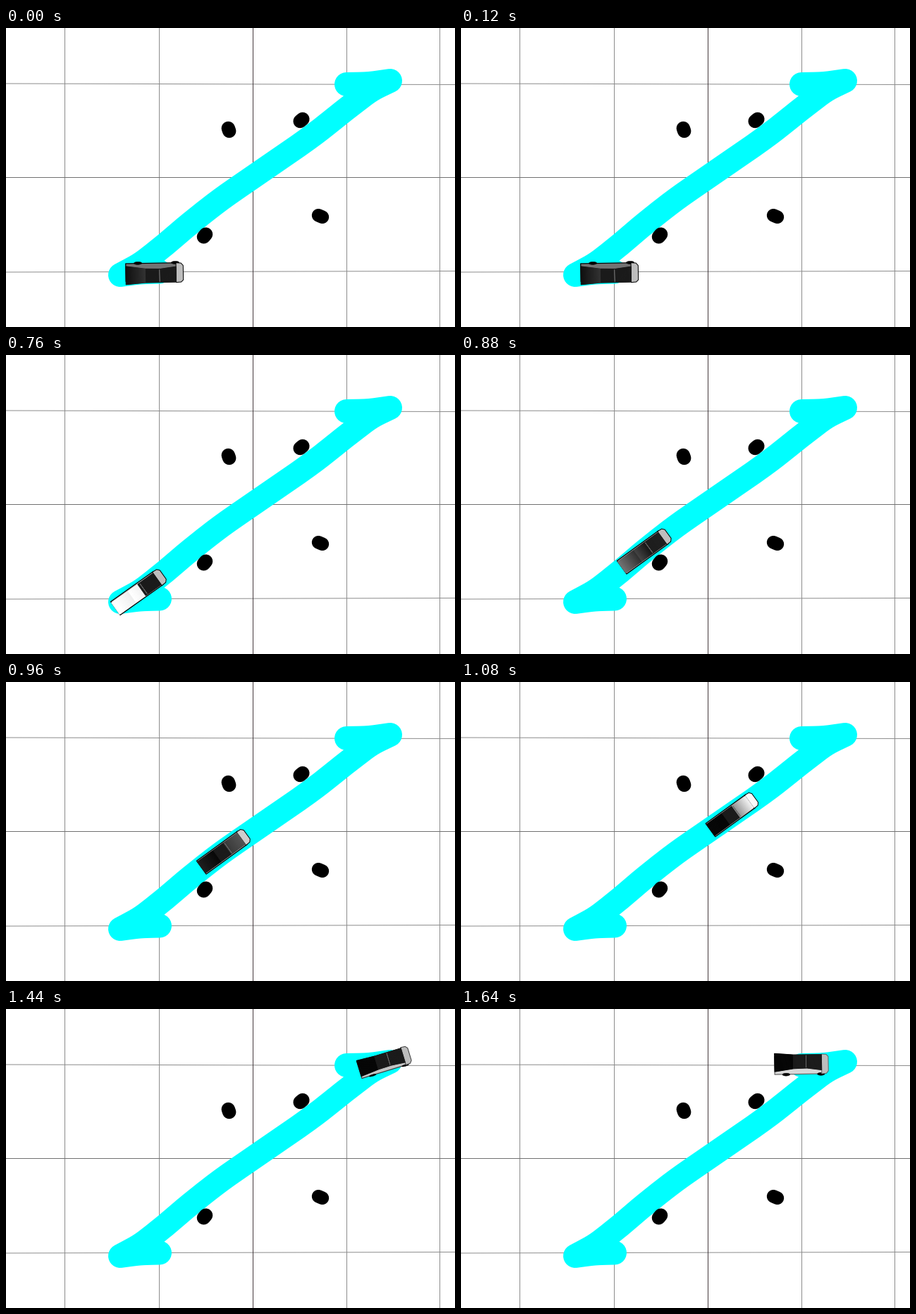
Animation of 637x425 px, one loop 2.04 s. Source, as a matplotlib script:

```python
import numpy as np
import matplotlib.pyplot as plt
from matplotlib.animation import FuncAnimation
from matplotlib.collections import PolyCollection

W, H, DPI = 637, 425, 100
PX = 72 / DPI
FRAMES, STEP = 51, 40
CENTER = np.array([350, 213])

# frames at which the car sets off, turns round at each cusp, and parks
START, CUSP_A, CUSP_B, PARK = 13, 17, 34.7, 41
SLOPE = 36  # heading on the long leg, degrees

fig = plt.figure(figsize=(W / DPI, H / DPI), dpi=DPI, facecolor="white")
ax = fig.add_axes([0, 0, 1, 1])
ax.set_xlim(0, W)
ax.set_ylim(H, 0)
ax.axis("off")


def curve(points, n=80):
    """Smooth cubic curve through the points, evenly sampled."""
    p = np.array(points, float)
    d = np.r_[0, np.cumsum(np.hypot(*np.diff(p, axis=0).T))]
    m = np.gradient(p, d, axis=0)
    s = np.linspace(0, d[-1], n)
    i = np.clip(np.searchsorted(d, s, side="right") - 1, 0, len(d) - 2)
    h = (d[i + 1] - d[i])[:, None]
    x = (s - d[i])[:, None] / h
    return ((2 * x**3 - 3 * x**2 + 1) * p[i] + (x**3 - 2 * x**2 + x) * h * m[i]
            + (3 * x**2 - 2 * x**3) * p[i + 1] + (x**3 - x**2) * h * m[i + 1])


def line(xs, ys, color):
    ax.plot(xs, ys, color=color, lw=PX, solid_capstyle="butt", snap=False, zorder=1)


# grid
for x in (83.5, 217.5, 483.5, 615.5):
    line([x, x], [0, H], "#8c8c8c")
for left, right in ((79, 80.5), (347, 345.5)):
    line([0, W], [left, right], "#8c8c8c")
line([0, W], [212.5, 212.5], "#707070")
line([350.5, 350.5], [0, H], "#453a3e")

# driven track: back up, cross over, back up again
LEG_A = curve([(218, 346.5), (190, 347.5), (162, 351)])
LEG_MAIN = curve([(162, 351), (190, 335.5), (217, 315), (261, 278), (303, 245),
                  (350, 212), (440, 149), (492, 108), (520, 87.5), (545, 75)])
LEG_B = curve([(545, 75), (515, 79), (483, 80)])
ax.plot(*np.vstack([LEG_A, LEG_MAIN, LEG_B]).T, color="#00ffff", lw=34 * PX,
        solid_capstyle="round", solid_joinstyle="round", zorder=2)

# obstacles, each a short thick dab
for x, y, dx, dy, size in ((316, 144.5, .7, 2, 19.4), (419, 131, 1.8, -1.5, 19.5),
                           (282, 295, 1.5, -1.8, 19.5), (446, 267.5, 2.8, 1.2, 18.8)):
    ax.plot([x - dx, x + dx], [y - dy, y + dy], color="black", lw=size * PX,
            solid_capstyle="round", zorder=3)


def travel(t, total, speed_up, slow_down):
    """Share of the way covered with steady speed between two linear ramps."""
    v = 1 / (total - (speed_up + slow_down) / 2)
    if t >= total - slow_down:
        return 1 - v * (total - t)**2 / (2 * slow_down)
    if t < speed_up:
        return v * t**2 / (2 * speed_up)
    return v * (t - speed_up / 2)


def smooth(t, start, end):
    x = np.clip((t - start) / (end - start), 0, 1)
    return x * x * (3 - 2 * x)


def bump(t, mid, width):
    return np.exp(-((t - mid) / width)**2)


def along(leg, share):
    i = share * (len(leg) - 1)
    return np.array([np.interp(i, np.arange(len(leg)), c) for c in leg.T])


def pose(t):
    """Position on the track and heading in degrees."""
    t = np.clip(t, START, PARK)
    if t < CUSP_A:
        share = travel(t - START, CUSP_A - START, 0, 4)
        pos = along(LEG_A, .13 + .87 * share)
    elif t < CUSP_B:
        pos = along(LEG_MAIN, travel(t - CUSP_A, CUSP_B - CUSP_A, 2, 2.7))
    else:
        pos = along(LEG_B, travel(t - CUSP_B, PARK - CUSP_B, 2, 4))
    turn = smooth(t, START, 19.5) - smooth(t, 31.5, 40)
    return pos, 1 + (SLOPE - 1) * turn


def roof_tone(u, t, lean):
    """Grey of the roof at u along the car, with two passing reflections."""
    tone = np.where(u < -12, .02 + .18 * max(lean, 0) * (u + 40) / 28, .1)
    rear, fore = bump(t, 19, 3.3), bump(t, 27, 2.6)
    tone = tone + (u < 4) * rear * (1 - (1.1 - rear) * (u + 40) / 30).clip(0)
    tone = tone + (u > 6) * fore * (.45 + .4 * (u - 6) / 24)
    return np.clip(tone, 0, 1)


def car(t):
    """Polygons, fills, edges and widths of the car seen from above."""
    t = np.clip(t, START, PARK)
    pos, heading = pose(t)
    a = np.radians(heading)
    fwd = np.array([np.cos(a), -np.sin(a)])
    down = np.array([np.sin(a), np.cos(a)])
    lean = np.clip(np.dot(pos - CENTER, down) / 133, -1, 1)
    length = .985 - .00024 * np.dot(pos - CENTER, fwd)
    flip, k = (1 if lean >= 0 else -1), abs(lean)
    pos = pos + 2 * lean * down  # the tall body tips away from the middle

    def place(points):
        u, w = np.array(points, float).T
        return pos + np.outer(u * length, fwd) + np.outer(w * flip, down)

    def mix(flat, tilted):
        return flat + (tilted - flat) * k

    def outer(u):
        return mix(9.8, np.interp(u, (-40, -12, 30), (15.5, 13.2, 13)))

    def inner(u):
        return mix(-9.8, np.interp(u, (-40, -12, 8, 30), (-10.5, -6.5, -6, -9)))

    polys, fills, edges, widths = [], [], [], []

    def add(points, tone, rim=None, width=1):
        polys.append(place(points))
        fills.append((tone,) * 3)
        edges.append((tone if rim is None else rim,) * 3)
        widths.append(width * PX)

    # body side and wheels
    low, high = mix(-11.6, -14.5), mix(11.6, 11)
    edge = .4 * max(-lean, 0)
    add([(-40, low), (32, low), (32, high), (-40, high)], .65 - .2 * lean, edge, 1.2)
    if k > .25:
        ring = np.linspace(0, 2 * np.pi, 20)
        for u in (-23, 29):
            add(np.c_[u + 5.5 * np.cos(ring), low - .3 + 2 * k * np.sin(ring)], 0, width=.5)

    # front
    add([(30, low), (37, low + .5), (40, low + 4), (40, mix(7.6, 10)),
         (37, mix(11.1, 13)), (30, mix(11.6, 13.5))],
        .74 + .24 * bump(t, 27, 2.6), edge)

    # roof in short slices, then the thin seam across it
    cuts = np.arange(-40, 31, 2)
    for u, v in zip(cuts[:-1], cuts[1:]):
        add([(u, inner(u)), (v, inner(v)), (v, outer(v)), (u, outer(u))],
            float(roof_tone(np.float64((u + v) / 2), t, lean)))
    add([(7, inner(7) + 1), (7, outer(7) - 1), (7.2, outer(7) - 1)], .4, width=.7)
    return polys, fills, edges, widths


body = PolyCollection([], zorder=5)
ax.add_collection(body, autolim=False)


def draw(i):
    polys, fills, edges, widths = car(i)
    body.set_verts(polys)
    body.set_facecolor(fills)
    body.set_edgecolor(edges)
    body.set_linewidth(widths)
    return [body]


anim = FuncAnimation(fig, draw, frames=FRAMES, interval=STEP, repeat=True,
                     repeat_delay=0, blit=False)
plt.show()
```
